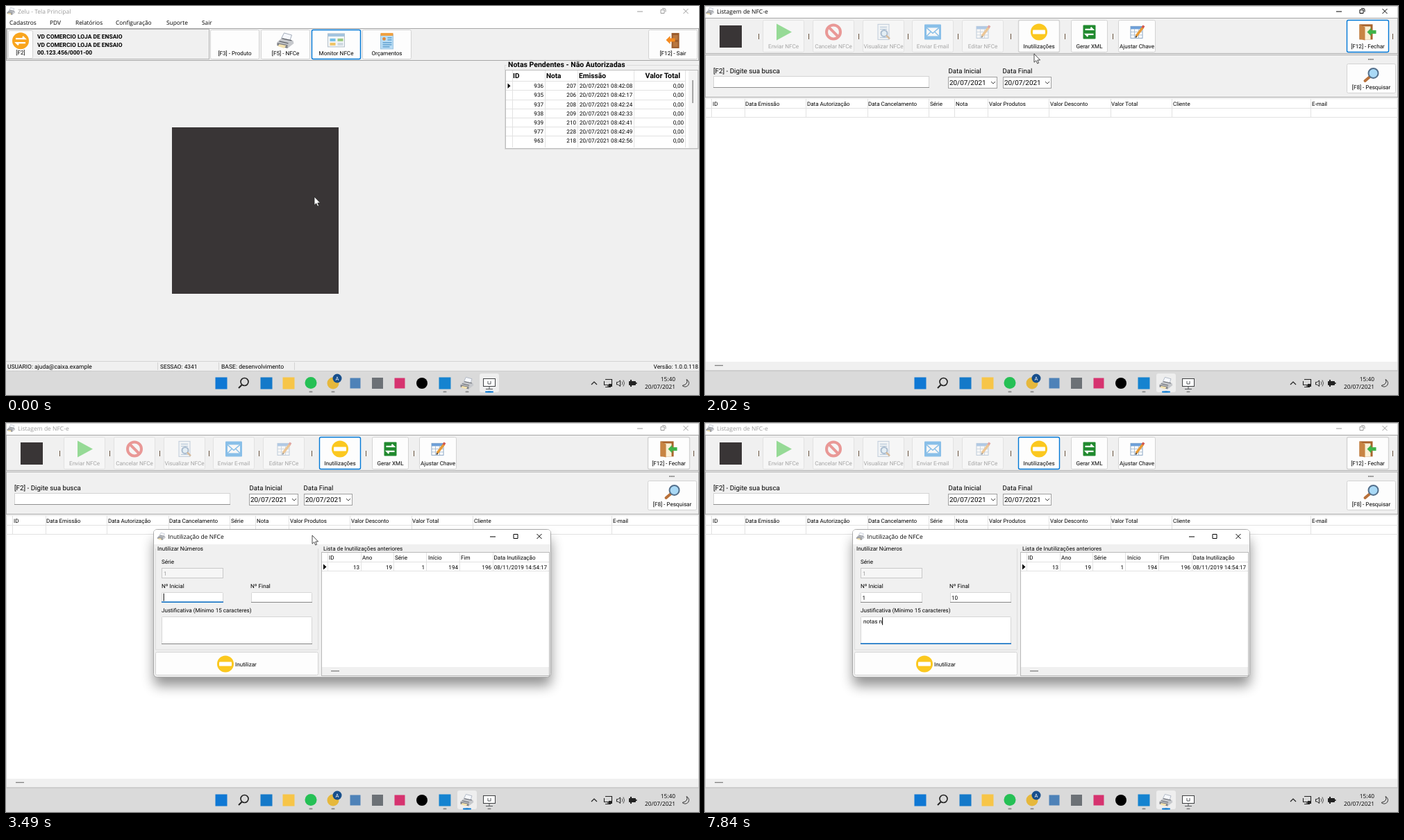
An HTML page that plays this animation: 998x561 px, repeating every 8000 ms.

```html
<!DOCTYPE html>
<html lang="pt-BR">
<head>
<meta charset="utf-8">
<title>Inutilização de NFCe</title>
<style>
  html, body { margin: 0; height: 100%; overflow: hidden; background: #f0f0f0; }
  svg { display: block; width: 100vw; height: 100vh; }
  text { font-family: Roboto, sans-serif; white-space: pre; text-rendering: geometricPrecision; }
  .ui { font-family: "Open Sans", sans-serif; }
</style>
</head>
<body>
<svg id="stage" viewBox="0 0 998 561" preserveAspectRatio="none"></svg>
<script>
const DURATION = 8000;
const BLUE = '#0078d7', DARK = '#393536', PANEL = '#f0f0f0', LINE = '#e2e2e2', MUTED = '#9a9a9a';

// ---------- drawing helpers ----------
const box = (x, y, w, h, fill, extra = '') =>
  `<rect x="${x}" y="${y}" width="${w}" height="${h}" fill="${fill}" ${extra}/>`;
const frame = (x, y, w, h, fill, stroke, extra = '') =>
  box(x + .5, y + .5, w - 1, h - 1, fill, `stroke="${stroke}" ${extra}`);
const label = (x, y, str, size = 8.1, extra = '') =>
  `<text x="${x}" y="${y}" font-size="${size}" ${extra}>${str}</text>`;
const uiText = (x, y, str, extra = '', size = 8.5) => label(x, y, str, size, `class="ui" ${extra}`);
const path = (d, stroke, width = 1, extra = '') =>
  `<path d="${d}" fill="none" stroke="${stroke}" stroke-width="${width}" ${extra}/>`;
const shape = (d, fill, extra = '') => `<path d="${d}" fill="${fill}" ${extra}/>`;
const disc = (x, y, r, fill) => `<circle cx="${x}" cy="${y}" r="${r}" fill="${fill}"/>`;
const icon = (name, x, y, scale = 1) =>
  `<g transform="translate(${x} ${y}) scale(${scale})">${icons[name]}</g>`;
const vlines = (xs, y1, y2, color = LINE) => path(xs.map(x => `M${x + .5} ${y1}V${y2}`).join(''), color);
const END = 'text-anchor="end"', MID = 'text-anchor="middle"', BOLD = 'font-weight="700"';

// ---------- icons, centred on 0,0 and about 24 units wide ----------
const sheet = box(-9, -8, 17, 17, '#fff', 'stroke="#8aa6c4"') + box(-9, -8, 17, 4, '#6ea0d8') +
  path('M-9 0H8M-9 4.5H8M-3.5 -4V9M2.5 -4V9', '#9cb2c8', .8);
const arrow = 'M-5 0L1 -6V-2.5H8V2.5H1V6Z';
const icons = {
  printer: shape('M-2 -11L9 -8L6 1L-6 -3Z', '#f6f8fc', 'stroke="#a3acba"') +
    shape('M-12 2L-5 -4L11 0L12 4L3 11L-12 7Z', '#c6c8cc') +
    shape('M-12 3L3 6V11L-12 7Z', '#7d7f85') + shape('M-9 5L1 7L-2 11L-11 8Z', '#f3e2b0') +
    path('M-5 -3L9 0M-9 1L4 4', '#5c5f66', 1.2),
  swap: disc(0, 0, 12, '#f9a51d') +
    path('M-7 -3H6L3 -6M7 3H-6L-3 6', '#fff', 2.4),
  monitor: box(-12, -10, 24, 19, '#f3f6f8', 'stroke="#b4bfc9"') + box(-12, -10, 24, 4, '#a3c3de') +
    box(-9, -3, 8, 4, '#74bfe6') + box(2, -3, 8, 4, '#9dcb80') +
    box(-9, 3, 8, 4, '#f0c466') + box(2, 3, 8, 4, '#cfd9e1'),
  quote: box(-9, -9, 18, 21, '#b9ddf5', 'stroke="#9cc4e2"') + box(-9, -11, 18, 4, '#f0a040') +
    disc(-4, -2.5, 2.4, '#e08a3c') + path('M1 -4H7M1 -1H7M-6 3H7M-6 6H7M-6 9H4', '#4f94c8', 1.2),
  exit: box(-2, -11, 11, 22, '#9a5a2c') + box(0, -8, 7, 7, '#b9773f') + box(0, 2, 7, 7, '#b9773f') +
    shape(arrow, '#f58a1f', 'transform="translate(-5 -1)"'),
  close: box(-12, -11, 19, 22, '#a9632b') + box(-9, -8, 13, 19, '#fbf0d5') +
    shape('M-12 -11L-4 -7V12L-12 10Z', '#c88443') +
    shape(arrow, '#3fb34a', 'transform="translate(4 0)"'),
  play: shape('M-10 -12L12 0L-10 12Z', '#35c435'),
  cancel: `<circle r="10" fill="none" stroke="#e23a36" stroke-width="4"/>` + path('M-7 -7L7 7', '#e23a36', 4),
  view: box(-8, -11, 16, 22, '#f4f8fc', 'stroke="#8ea8c4"') + path('M-5 -7H5M-5 -4H5M-5 8H5', '#6c93bc') +
    `<circle cx="1" cy="2" r="4.5" fill="#d8ecfa" stroke="#5d84ad" stroke-width="2"/>` + path('M4 5L9 10', '#b98242', 2.5),
  mail: box(-12, -11, 24, 22, '#1b8be0', 'rx="1"') + box(-9, -6, 18, 12, '#fff') +
    path('M-9 -6L0 2L9 -6M-9 6L-3 0M9 6L3 0', '#1b8be0', 1.4),
  edit: sheet + path('M-1 6L9 -7', '#e89a35', 3.4) + path('M8 -6L10 -9', '#d2574f', 3.4) + path('M-2 8L-.5 5.8', '#444', 2),
  stop: disc(0, 0, 12, '#fbc81f') + box(-9, -3, 18, 6, '#fff', 'rx="1"'),
  xml: box(-9, -10, 18, 20, '#218a2f', 'rx="1"') +
    path('M-6 -3.5H5L2 -6.5M6 3.5H-5L-2 6.5', '#fff', 2.2),
  search: path('M-2 3L-9 9', '#b9713a', 4, 'stroke-linecap="round"') +
    `<circle cx="3" cy="-2" r="7" fill="#a9d9f6" stroke="#54708c" stroke-width="2"/>`
};

// ---------- shared parts ----------
const RESTORE = 'm-3 -2h5v5h-5zm2 -2h3q2 0 2 2v3', MAXIMIZE = 'm-3 -3h6v6h-6z';
const caption = (id, title, [min, max, close], y, x0, maxIcon = RESTORE) => `<g id="${id}" color="#000">` +
  icon('printer', x0, y, .48) + uiText(x0 + 9.5, y + 3.6, title, 'fill="currentColor"') +
  path(`M${min - 4} ${y + .5}h8M${max} ${y}${maxIcon}M${close - 3.5} ${y - 3.5}l7 7m0 -7l-7 7`, 'currentColor') + '</g>';

const button = (x, y, w, h, name, text, { disabled = false, id = '' } = {}) => {
  const cx = x + w / 2;
  return `<g ${disabled ? 'opacity=".48"' : ''}>` +
    frame(x, y, w, h, '#fdfdfd', '#d3d3d3', `rx="2" ${id && `id="${id}" stroke-width="1.4"`}`) +
    (name ? icon(name, cx, y + h * .37) : '') +
    label(cx, y + h - 5.6, text, 8.1, MID + (disabled ? ' fill="#555"' : '')) + '</g>';
};
const groove = (x, y, w, h) => frame(x, y, w, h, PANEL, '#a6a6a6');

// ---------- main window ----------
const pending = [[936, 207, '08'], [935, 206, '17'], [937, 208, '24'], [938, 209, '33'],
  [939, 210, '41'], [977, 228, '49'], [963, 218, '56']];

const mainWindow = () => box(0, 0, 998, 526, PANEL) + box(0, 0, 998, 32, '#fff') +
  caption('mainCaption', 'Zelu - Tela Principal', [913, 946, 979], 7.5, 7.5) +
  '<g id="menu">' + [['Cadastros', 5], ['PDV', 63], ['Relatórios', 100], ['Configuração', 158], ['Suporte', 231], ['Sair', 282]]
    .map(([s, x]) => uiText(x, 26.8, s, '', 8.35)).join('') + '</g>' +
  groove(0, 32, 998, 47) + frame(1, 33, 292, 44, PANEL, '#b5b5b5') +
  button(3, 35, 36, 41, 'swap', '[F2]') +
  ['VD COMERCIO LOJA DE ENSAIO', 'VD COMERCIO LOJA DE ENSAIO', '00.123.456/0001-00']
    .map((s, i) => label(45, 47 + i * 11.7, s, 8.45, BOLD)).join('') +
  button(294, 34, 71, 43, '', '[F3] - Produto') +
  button(367, 34, 71, 43, 'printer', '[F5] - NFCe') +
  button(440, 34, 71, 43, 'monitor', 'Monitor NFCe', { id: 'monitorButton' }) +
  button(513, 34, 71, 43, 'quote', 'Orçamentos') +
  button(925, 34, 71, 43, 'exit', '[F12] - Sair') +
  box(239, 175, 240, 240, DARK) +
  frame(718, 85, 280, 122, PANEL, '#dadada') + box(721, 80, 173, 10, PANEL) +
  label(723, 88.2, 'Notas Pendentes - Não Autorizadas', 10.5, BOLD) +
  frame(719, 92, 278, 114, '#fff', '#bdbdbd') + box(983, 93, 13, 112, '#f4f4f4') +
  box(988.3, 107, 1.4, 33, '#858585') + vlines([729, 776, 823, 904, 978], 93, 204) +
  label(730, 104.3, 'ID', 10, BOLD) + label(778, 104.3, 'Nota', 10, BOLD) +
  label(825, 104.3, 'Emissão', 10.2, BOLD) + label(971, 104.3, 'Valor Total', 10.5, BOLD + ' ' + END) +
  shape('M722.5 111.5V119L726.5 115.2Z', '#000') +
  pending.map(([id, number, seconds], i) => {
    const y = 118.3 + i * 13.17;
    return path(`M720 ${Math.round(y - 10)}.5H978`, LINE) + label(774, y, id, 8.1, END) + label(821, y, number, 8.1, END) +
      label(826, y, `20/07/2021 08:42:${seconds}`) + label(976, y, '0,00', 8.1, END);
  }).join('') +
  path('M0 512.5H998', '#d4d4d4') + vlines([218, 306, 415], 514, 525, '#d4d4d4') +
  label(2, 522.8, 'USUARIO: ajuda@caixa.example', 8.5) + label(222, 522.8, 'SESSAO: 4341', 8.3) +
  label(310, 522.8, 'BASE: desenvolvimento', 8.6) + label(997, 522.8, 'Versão: 1.0.0.118', 8.3, END);

// ---------- list window ----------
const dateBox = (x, w) => frame(x, 102, w, 17, '#fff', '#a0a0a0') + label(x + 2, 113.8, '20/07/2021', 9.9) +
  path(`M${x + w - 9} 109l3 3l3 -3`, '#444');

const listWindow = () => frame(0, 0, 998, 526, '#fff', '#cfcfcf') +
  caption('listCaption', 'Listagem de NFC-e', [913, 946, 979], 7.5, 7.5) +
  groove(0, 17, 998, 52) + groove(0, 70, 998, 62) + box(21, 28, 32, 32, DARK) +
  vlines([77, 149, 221, 292, 364, 440, 518, 587, 990], 40, 48, '#6b5540') +
  [['play', 'Enviar NFCe', 83], ['cancel', 'Cancelar NFCe', 155], ['view', 'Visualizar NFCe', 227],
    ['mail', 'Enviar E-mail', 298], ['edit', 'Editar NFCe', 370]]
    .map(([name, text, x]) => button(x, 20, 60, 47, name, text, { disabled: true })).join('') +
  button(451, 20, 60, 47, 'stop', 'Inutilizações', { id: 'voidButton' }) +
  button(527, 20, 53, 47, 'xml', 'Gerar XML') + button(595, 20, 54, 47, 'edit', 'Ajustar Chave') +
  button(924, 20, 61, 47, 'close', '[F12] - Fechar', { id: 'closeButton' }) +
  label(12, 96.5, '[F2] - Digite sua busca', 9.8) + frame(12, 101, 311, 17, '#fff', '#d4d4d4') +
  path('M12 117.5H323', '#909090') +
  label(350.5, 96.5, 'Data Inicial', 9.6) + label(428.5, 96.5, 'Data Final', 9.6) + dateBox(350, 71) + dateBox(429, 70) +
  label(959, 80, '---', 10, MID) + button(924, 83, 71, 43, 'search', '[F8] - Pesquisar') +
  path('M0 133.5H998M0 147.5H998M0 160.5H998', LINE) +
  vlines([9, 57, 145, 234, 322, 359, 407, 495, 584, 672, 872], 134, 161) +
  [['ID', 11], ['Data Emissão', 58], ['Data Autorização', 147], ['Data Cancelamento', 235], ['Série', 324], ['Nota', 361],
    ['Valor Produtos', 409], ['Valor Desconto', 497], ['Valor Total', 585], ['Cliente', 674], ['E-mail', 874]]
    .map(([s, x]) => label(x, 143.8, s, 8)).join('') +
  box(1, 513, 996, 12, PANEL) + box(14, 517.8, 12, 1.3, '#808080');

// ---------- dialog ----------
const field = (id, x, y, w, h, tx, ty) => frame(x, y, w, h, '#fff', '#d6d6d6', 'rx="1"') +
  path(`M${x} ${y + h - .5}h${w}`, '#868686') +
  `<path id="${id}Line" d="M${x} ${y + h - .7}h${w}" stroke="#0067c0" stroke-width="1.5"/>` +
  label(tx, ty, '', 8.15, `id="${id}Text"`);

const dialog = () =>
  box(213, 158, 572, 212, '#000', 'rx="6" opacity=".42" filter="url(#shadow)"') +
  frame(212, 153, 573, 214, PANEL, '#a8a8a8', 'rx="5"') +
  shape('M213 175V158Q213 154 217 154H780Q784 154 784 158V175Z', '#fff') +
  caption('dialogCaption', 'Inutilização de NFCe', [701, 734, 768], 163.5, 224, MAXIMIZE) +
  path('M215.5 181V327H449.5V181', '#dcdcdc') +
  label(218, 183.8, 'Inutilizar Números') + label(224, 203, 'Série') +
  frame(224, 209, 89, 15, '#f6f6f6', '#c8c8c8') + label(227, 219.5, '1', 8.1, `fill="${MUTED}"`) +
  label(224, 238, 'Nº Inicial') + label(352, 238, 'Nº Final') +
  label(224, 273, 'Justificativa (Mínimo 15 caracteres)') +
  field('first', 224, 244, 89, 15, 226.5, 254.5) + field('last', 353, 244, 88, 15, 355, 254.5) +
  field('reason', 224, 279, 217, 40, 228, 289) +
  frame(215, 330, 235, 34, '#fdfdfd', '#d3d3d3', 'rx="2"') + icon('stop', 316, 347.5) + label(330, 350.6, 'Inutilizar') +
  label(457, 183.8, 'Lista de Inutilizações anteriores') +
  frame(454, 186, 329, 179, '#fff', '#b8b8b8') + path('M455 200.5H782M455 213.5H782', LINE) +
  vlines([463, 511, 558, 605, 653, 701], 187, 214) +
  [['ID', 465], ['Ano', 513], ['Série', 560], ['Início', 608], ['Fim', 655], ['Data Inutilização', 702.5]]
    .map(([s, x]) => label(x, 197.3, s)).join('') +
  [['13', 509], ['19', 556], ['1', 603], ['194', 651], ['196', 699], ['08/11/2019 14:54:17', 779]]
    .map(([s, x]) => label(x, 210.6, s, 8.1, END)).join('') +
  shape('M457 203.5V211.5L461.5 207.5Z', '#000') + box(455, 352, 327, 12, PANEL) + box(468, 357, 12, 1.3, '#808080') +
  box(0, 0, 1, 11, '#000', 'id="caret"');

// ---------- taskbar ----------
const square = (x, color, size = 17) => box(x - size / 2, 544 - size / 2, size, size, color);
const taskbar = () => box(0, 526, 998, 35, '#dadada') + path('M0 526.5H998', '#cccccc') +
  box(0, 530, 28, 27, '#eeeeee', 'rx="3" id="taskHighlight"') +
  [439, 471, 632, 664, 696].map(x => box(x - 2.5, 555.5, 5, 1.8, '#868686', 'rx="1"')).join('') +
  box(0, 555.5, 12, 2, BLUE, 'rx="1" id="taskMark"') +
  square(310, '#0f78d4') + '<circle cx="343.5" cy="542" r="5.5" fill="none" stroke="#222" stroke-width="1.6"/>' +
  path('M339.5 546.5L335 551', '#222', 2) +
  square(375, '#1479c9') + square(407, '#f7c548') + disc(439, 543.5, 8.5, '#25c055') + disc(471, 544, 8.5, '#e6b83c') +
  disc(477, 537, 6.5, '#174f8c') + label(477, 539.8, 'A', 7.5, MID + ' fill="#fff"') +
  square(503, '#4e82b8', 15) + square(535, '#6c7176', 16) + square(567, '#d6336f', 15) + disc(599, 544, 8, '#000') +
  square(632, '#1583d0') + icon('printer', 664, 544, .78) +
  frame(687, 537, 18, 12, '#fff', '#3f4143') + path('M696 549V552M691 552.5H701M694 541V545H698V541', '#55585c') +
  path('M843 546L847 542L851 546', '#222', 1.2) +
  path('M863 538.5H872.5V546.5H861.5V541M867 547V549.5M863 549.5H871', '#222', 1.1) + box(868, 545, 5, 4, '#222') +
  path('M879.5 542.5H881.5L884.5 540V548.5L881.5 546H879.5Z', '#222') +
  path('M887 541.5Q888.5 544 887 546.5M889 539.5Q892 544 889 548.5', '#555') +
  box(897, 541, 10, 6, '#222', 'rx="1"') + box(907, 543, 1.5, 2, '#222') + path('M900 539V549', '#222', 2) +
  uiText(964, 541, '15:40', END, 8.3) + uiText(964, 552, '20/07/2021', END, 8.3) +
  path('M980 538.5Q983.5 545 974 547.5Q978.5 551 982.5 547Q985.5 542 980 538.5Z', '#333');

document.getElementById('stage').innerHTML =
  '<defs><filter id="shadow" x="-10%" y="-20%" width="120%" height="150%"><feOffset dy="9"/><feGaussianBlur stdDeviation="9"/></filter></defs>' +
  mainWindow() + `<g id="list">${listWindow()}</g><g id="dialog">${dialog()}</g>` + taskbar() +
  '<g id="pointer">' + shape('M0 0V12.2L2.8 9.7L4.7 14L6.6 13.2L4.8 9H8.6Z', '#fff', 'stroke="#222" stroke-width=".8"') + '</g>' +
  '<g id="beam">' + path('M-2.5 -6H2.5M0 -6V6M-2.5 6H2.5', '#222', .9) + '</g>' +
  '<g id="spinner"><circle r="5.4" fill="none" stroke="#b9def8" stroke-width="3.4"/>' +
  '<circle r="5.4" fill="none" stroke="#1584d6" stroke-width="3.4" stroke-dasharray="13 4"/></g>';

// ---------- motion ----------
const node = {};
document.querySelectorAll('[id]').forEach(el => node[el.id] = el);
const set = (id, attrs) => Object.entries(attrs).forEach(([k, v]) => node[id].setAttribute(k, v));
const show = (id, visible) => set(id, { visibility: visible ? 'visible' : 'hidden' });
const clamp = v => Math.min(1, Math.max(0, v));

const route = [[0, 444, 275], [70, 444, 275], [800, 474, 69], [2020, 474, 69], [2210, 477, 56], [2410, 477, 56],
  [2480, 476.5, 55], [3180, 476.5, 55], [3490, 441, 162], [3560, 441, 162], [4030, 262, 250], [4170, 262, 250],
  [4230, 268.5, 251], [DURATION, 268.5, 251]];

function pointerAt(t) {
  const i = route.findIndex(stop => stop[0] > t);
  const [t0, x0, y0] = route[i - 1], [t1, x1, y1] = route[i];
  const p = (t - t0) / (t1 - t0), e = p * p * (3 - 2 * p);
  return [x0 + (x1 - x0) * e, y0 + (y1 - y0) * e];
}

function openWindow(id, t, start, length, cx, cy) {
  const p = clamp((t - start) / length), scale = 1 - .18 * (1 - p) ** 3;
  show(id, p > 0);
  set(id, { opacity: clamp(p * 2), transform: `translate(${cx} ${cy}) scale(${scale}) translate(${-cx} ${-cy})` });
}

const within = (t, spans) => spans.some(([a, b]) => t >= a && t < b);

function render(t) {
  const [x, y] = pointerAt(t);
  const mainActive = t >= 800 && t < 1070;
  set('mainCaption', { color: mainActive ? '#000' : MUTED });
  set('menu', { fill: t < 1070 ? '#000' : '#777' });
  const monitorHover = t < 1070 && y < 77;
  set('monitorButton', { fill: monitorHover ? '#d8eafa' : t < 1070 ? '#fdfdfd' : '#efefef',
    stroke: t < 1070 ? BLUE : '#9a9a9a' });

  openWindow('list', t, 1210, 270, 500, 288);
  set('listCaption', { color: t < 2740 ? '#000' : MUTED });
  set('closeButton', { stroke: t < 2740 ? BLUE : '#d3d3d3' });
  const voidHover = t >= 2020 && y < 67;
  set('voidButton', { fill: voidHover ? '#d3e7f8' : '#fdfdfd', stroke: t >= 2740 || voidHover ? BLUE : '#d3d3d3' });
  openWindow('dialog', t, 3060, 270, 499, 260);

  const taskX = t < 800 ? 696 : 664;
  set('taskHighlight', { x: taskX - 14 });
  set('taskMark', { x: taskX - 6 });

  const texts = {
    first: t < 4690 ? '' : '1',
    last: t < 5770 ? '' : t < 5960 ? '1' : '10',
    reason: 'notas n'.slice(0, Math.max(0, Math.floor((t - 7180) / 110) + 1))
  };
  const focusStart = { first: 3100, last: 5360, reason: 6230 };
  const focus = t < 5360 ? 'first' : t < 6230 ? 'last' : 'reason';
  for (const id in texts) {
    node[id + 'Text'].textContent = texts[id];
    set(id + 'Line', { opacity: id === focus ? clamp((t - focusStart[id]) / 200) : 0 });
  }
  set('lastLine', { stroke: '#3c5f86' });

  const active = node[focus + 'Text'];
  const width = texts[focus] ? active.getComputedTextLength() : 0;
  set('caret', { x: +active.getAttribute('x') + width + .2, y: +active.getAttribute('y') - 8.7 });
  show('caret', t >= 3200 && !within(t, [[3830, 4030], [5290, 5360], [6160, 6230], [6910, 7180]]));

  const waiting = within(t, [[2800, 3180]]);
  const overField = x < 313 && y > 243;
  const hidden = within(t, [[4690, 5290], [5770, DURATION]]);
  show('pointer', !waiting && !overField);
  show('beam', overField && !hidden);
  show('spinner', waiting);
  set('pointer', { transform: `translate(${x} ${y})` });
  set('beam', { transform: `translate(${x} ${y})` });
  set('spinner', { transform: `translate(${x + 1.5} ${y + 2}) rotate(${t * .4})` });
}

function tick(now) {
  render(now % DURATION);
  requestAnimationFrame(tick);
}
render(0);
requestAnimationFrame(tick);
</script>
</body>
</html>
```
